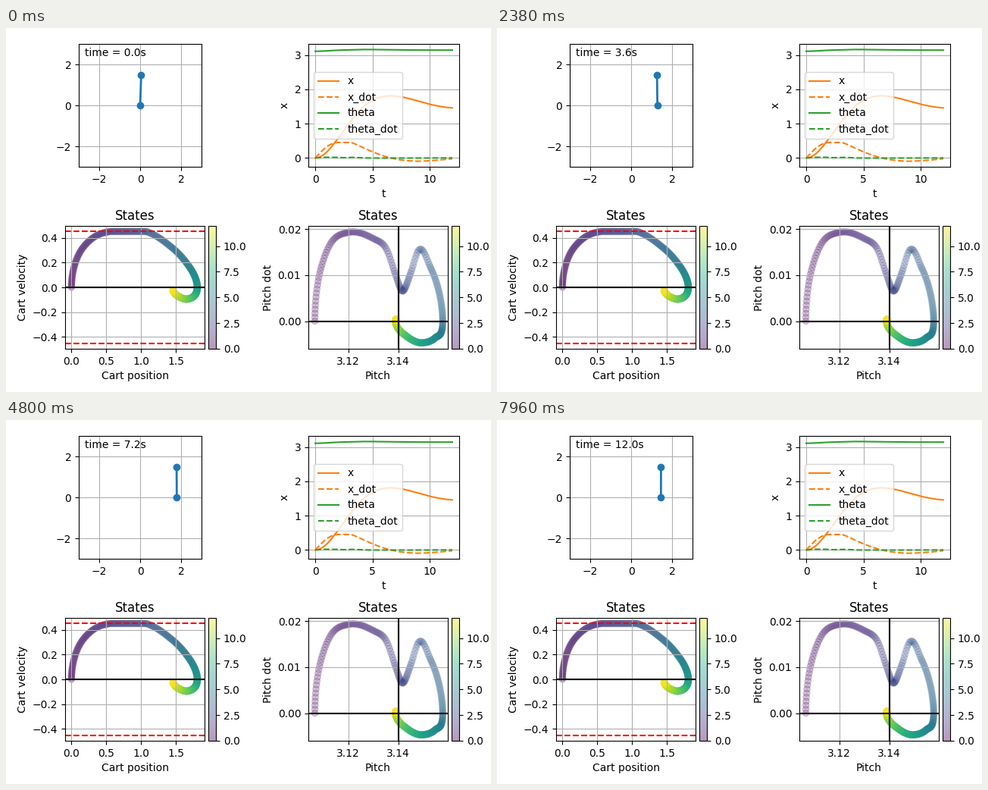
These frames come from a looping animation (640 px wide and 480 px high, 7.98 s). A matplotlib script:

```python
import numpy as np
import matplotlib.pyplot as plt
from matplotlib.animation import FuncAnimation
from matplotlib.cm import ScalarMappable

W, H, DPI = 640, 480, 100
DT = 0.03
LENGTH = 1.5
V_MAX = 0.45
t = np.arange(400) * DT


def smooth(*knots):
    """Cubic Hermite curve through (time, value) knots, sampled on t."""
    kt, kv = np.array(knots, float).T
    slope = np.gradient(kv, kt)
    i = np.clip(np.searchsorted(kt, t, side="right") - 1, 0, len(kt) - 2)
    h = kt[i + 1] - kt[i]
    s = (t - kt[i]) / h
    return ((1 + 2 * s) * (1 - s) ** 2 * kv[i] + s * (1 - s) ** 2 * h * slope[i]
            + s * s * (3 - 2 * s) * kv[i + 1] + s * s * (s - 1) * h * slope[i + 1])


def integrate(rate, start):
    steps = (rate[1:] + rate[:-1]) / 2 * DT
    return start + np.concatenate([[0], np.cumsum(steps)])


# The cart speeds up to its limit, cruises, overshoots and rolls back.
x_dot = np.minimum(V_MAX, smooth(
    (0, 0), (0.95, 0.312), (1.59, 0.427), (1.95, V_MAX), (3.1, V_MAX),
    (4.04, 0.322), (4.97, 0.181), (6.5, 0.007), (8.8, -0.094),
    (10.3, -0.075), (11.97, -0.023)))
x = integrate(x_dot, 0)

# The pole swings upright, wobbles while the cart cruises, then settles.
theta_dot = 1e-4 * smooth(
    (0, 0), (0.4, 112), (0.71, 173), (1.07, 193), (1.6, 179), (1.86, 162),
    (2.15, 106), (2.5, 66), (2.97, 109), (3.21, 156), (3.52, 117), (4.4, 0),
    (5.63, -37), (6.76, -47), (8.66, -28), (11.1, 0), (11.97, 5))
theta = integrate(theta_dot, np.pi - np.radians(2))

fig = plt.figure(figsize=(W / DPI, H / DPI), dpi=DPI)


def add_axes(left, top, width, height=162):
    return fig.add_axes([left / W, 1 - (top + height) / H,
                         width / W, height / H])


def phase_plot(left, pos, vel, xlabel, ylabel, **axes_opts):
    ax = add_axes(left, 261, 184)
    dots = ax.scatter(pos, vel, c=t, alpha=0.2)
    ax.axhline(0, color="k")
    ax.set(title="States", xlabel=xlabel, ylabel=ylabel, **axes_opts)
    ax.grid()
    fig.colorbar(ScalarMappable(dots.norm, dots.cmap), alpha=0.4,
                 cax=add_axes(left + 189, 261, 10), ticks=np.arange(0, 11, 2.5))
    return ax


cart = add_axes(96, 21, 162)
cart.set(xlim=(-3, 3), ylim=(-3, 3), xticks=(-2, 0, 2), yticks=(-2, 0, 2))
cart.grid()

series = add_axes(399, 21, 199)
series.plot(t, x, color="tab:orange", label="x")
series.plot(t, x_dot, "--", color="tab:orange", label="x_dot")
series.plot(t, theta, color="tab:green", label="theta")
series.plot(t, theta_dot, "--", color="tab:green", label="theta_dot")
series.set(xlabel="t", ylabel="x")
series.legend(loc="center left")
series.grid()

ax = phase_plot(78, x, x_dot, "Cart position", "Cart velocity",
                xlim=(-0.091, 1.911), ylim=(-0.495, 0.495),
                xticks=np.arange(0, 2, 0.5), yticks=np.linspace(-0.4, 0.4, 5))
for limit in (V_MAX, -V_MAX):
    ax.axhline(limit, color="r", ls="--")

ax = phase_plot(399, theta, theta_dot, "Pitch", "Pitch dot",
                xlim=(3.1041, 3.1598), ylim=(-0.006, 0.0207),
                xticks=(3.12, 3.14), yticks=(0, 0.01, 0.02))
ax.axvline(3.14, color="k")

# Everything but the pole is still: render it once and reuse it as a backdrop.
fig.canvas.draw()
backdrop = np.array(fig.canvas.buffer_rgba())
for ax in fig.axes:
    ax.set_visible(ax is cart)
cart.set_axis_off()
fig.figimage(backdrop, origin="upper", zorder=-1)

pole, = cart.plot([], [], "o-", color="tab:blue", lw=2)
clock = cart.text(0.05, 0.9, "", transform=cart.transAxes)


def update(i):
    pole.set_data([x[i], x[i] + LENGTH * np.sin(theta[i])],
                  [0, -LENGTH * np.cos(theta[i])])
    clock.set_text(f"time = {i * DT:.1f}s")
    return pole, clock


anim = FuncAnimation(fig, update, frames=range(1, len(t)), interval=20,
                     repeat=True, repeat_delay=0)
plt.show()
```
